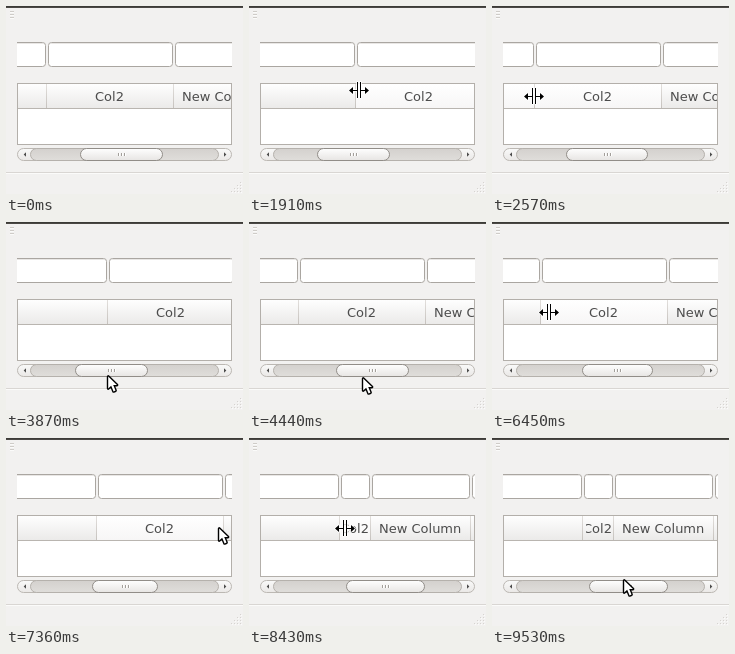
Recreate the animation shown at these times as an HTML page with a canvas. Size 237x188 px, loop 9560 ms.

```html
<!DOCTYPE html>
<html lang="en">
<head>
<meta charset="utf-8">
<title>Header columns</title>
<style>
html, body { margin: 0; width: 100%; height: 100%; overflow: hidden; background: #f2f1f0; }
canvas { display: block; width: 237px; height: 188px; }
</style>
</head>
<body>
<canvas id="stage"></canvas>
<script>
const W = 237, H = 188, LOOP = 9560, STEP = 40;
const MIN_WIDTH = 31, VIEW = 214, TROUGH = 189;
const LAG = 28; // widgets trail the pointer slightly
const canvas = document.getElementById('stage');
const ctx = canvas.getContext('2d');
const dpr = window.devicePixelRatio || 1;
canvas.width = W * dpr;
canvas.height = H * dpr;
ctx.scale(dpr, dpr);

// Pointer gestures: start, end, and the point reached.
const entry = { x: 76, y: 98, time: 440 };
const moves = [
  [440, 1070, 40, 80],
  [1590, 1950, 113, 84], [1950, 2330, 22, 89], [2330, 2530, 42, 90], [2570, 2890, 101, 89],
  [3080, 3520, 101, 152],
  [3870, 4190, 156, 155], [4190, 4590, 89, 154], [4590, 4930, 124, 153],
  [5090, 5290, 82, 93], [5290, 5950, 35, 91],
  [6330, 6610, 91, 88],
  [6760, 7360, 212, 88], [7360, 7590, 216, 90],
  [8110, 8430, 96, 90], [8430, 8510, 106, 90],
  [8670, 9100, 113, 149], [9290, 9530, 131, 140]
];
const drags = {
  widen: [1590, 3080], scroll: [3870, 5000], widenMore: [6330, 6760], narrow: [8110, 8670]
};

const clamp = (v, lo, hi) => Math.min(hi, Math.max(lo, v));
const smooth = u => u * u * (3 - 2 * u);

function pointer(t) {
  let { x, y } = entry;
  for (const [start, end, toX, toY] of moves) {
    if (t <= start) break;
    const elapsed = t >= end ? end - start : t - start;
    const u = smooth(elapsed / (end - start));
    x += (toX - x) * u;
    y += (toY - y) * u;
  }
  return { x: Math.round(x), y: Math.round(y) };
}

function stepped(t) {
  const move = moves.find(([start, end]) => t >= start && t < end);
  return move ? move[0] + Math.floor((t - move[0]) / STEP) * STEP : t;
}

function pull(t, [start, end]) {
  return pointer(clamp(t - LAG, start, end)).x - pointer(start).x;
}

function layout(t) {
  const columns = [
    { name: 'Col1', width: 158 + pull(t, drags.widen) + pull(t, drags.widenMore) },
    { name: 'Col2', width: Math.max(MIN_WIDTH, 127 + pull(t, drags.narrow)) },
    { name: 'New Column', width: 100 },
    { name: 'New Column', width: 102 }
  ];
  const total = columns.reduce((sum, c) => sum + c.width, 0);
  const offset = 130 + Math.round(pull(t, drags.scroll) * 548 / TROUGH);
  let left = 12 - offset;
  for (const c of columns) {
    c.left = left;
    left = c.right = left + c.width;
  }
  return { columns, total, offset };
}

function fill(x, y, w, h, color) {
  ctx.fillStyle = color;
  ctx.fillRect(x, y, w, h);
}

function box(x, y, w, h, r, paint, border) {
  ctx.beginPath();
  ctx.roundRect(x + .5, y + .5, w - 1, h - 1, r);
  ctx.fillStyle = paint;
  ctx.fill();
  ctx.strokeStyle = border;
  ctx.lineWidth = 1;
  ctx.stroke();
}

function shade(y0, y1, top, bottom) {
  const g = ctx.createLinearGradient(0, y0, 0, y1);
  g.addColorStop(0, top);
  g.addColorStop(1, bottom);
  return g;
}

function clipped(x, y, w, h, draw) {
  ctx.save();
  ctx.beginPath();
  ctx.rect(x, y, w, h);
  ctx.clip();
  draw();
  ctx.restore();
}

function drawWindow() {
  fill(0, 0, W, H, '#f2f1f0');
  fill(0, 0, W, 1, '#3c3b37');
  fill(0, 1, W, 1, '#4a4844');
  for (let y = 5; y < 13; y += 3) {
    fill(4, y, 4, 1, '#cfccc8');
    fill(4, y + 1, 4, 1, '#fbfbfa');
  }
  fill(0, 166, W, 1, '#d9d6d3');
  fill(0, 167, W, 1, '#fbfbfa');
  for (let row = 0; row < 4; row++) {
    for (let col = 0; col <= row; col++) {
      const x = 234 - col * 3, y = 176 + row * 3;
      fill(x, y, 1, 1, '#d6d3d0');
      fill(x + 1, y + 1, 1, 1, '#fbfbfa');
    }
  }
}

function drawEdits(columns) {
  clipped(11, 34, 215, 29, () => {
    for (const c of columns) {
      box(c.left + 2, 36, c.width - 2, 25, 3, '#ffffff', '#aaa6a1');
      fill(c.left + 5, 37, c.width - 8, 1, '#e9e7e5');
    }
  });
}

function drawTable(columns, hoverX) {
  fill(11, 77, 215, 62, '#b3afaa');
  fill(12, 78, 213, 60, '#ffffff');
  fill(12, 78, 213, 24, shade(78, 102, '#fefefe', '#ebeae9'));
  fill(12, 102, 213, 1, '#b9b5b0');
  ctx.font = '13px "DejaVu Sans", sans-serif';
  clipped(12, 78, 213, 24, () => {
    for (const c of columns) {
      if (hoverX > c.left - 2 && hoverX < c.right + 2) {
        fill(c.left + 1, 78, c.width - 1, 24, shade(78, 102, '#ffffff', '#f7f6f6'));
      }
      fill(c.right, 78, 1, 24, shade(78, 102, '#e2dfdc', '#c6c2be'));
      clipped(c.left + 4, 78, c.width - 6, 24, () => {
        const indent = Math.round((c.width - ctx.measureText(c.name).width) / 2);
        ctx.fillStyle = '#4c4c4c';
        ctx.fillText(c.name, c.left + indent, 95);
      });
    }
  });
}

function drawStepper(x, dir) {
  ctx.beginPath();
  ctx.moveTo(x - dir, 146.3);
  ctx.lineTo(x - dir, 150.7);
  ctx.lineTo(x + dir * 1.3, 148.5);
  ctx.fillStyle = '#4c4c4c';
  ctx.fill();
}

function drawScrollbar(offset, total) {
  box(11, 142, 215, 13, 6, shade(142, 155, '#fafafa', '#e9e7e5'), '#bcb8b3');
  box(24, 142, TROUGH, 13, 6, shade(142, 155, '#d3d0cd', '#e0dedb'), '#b5b1ac');
  drawStepper(19, -1);
  drawStepper(219, 1);
  const x = Math.round(24 + offset / total * TROUGH);
  const w = Math.floor(VIEW / total * TROUGH);
  box(x, 142, w, 13, 6, shade(142, 155, '#ffffff', '#e6e4e2'), '#918d88');
  const mid = Math.floor(x + w / 2);
  for (const dx of [-3, 0, 3]) {
    fill(mid + dx, 147, 1, 3, '#a39f9a');
    fill(mid + dx + 1, 147, 1, 3, '#ffffff');
  }
}

const arrow = new Path2D('M1.2 2.6V14.6L4.2 11.8 6.6 17.4 8.5 16.6 6.2 11H10Z');
const splitter = new Path2D(
  'M-2-8H-1V8H-2ZM1-8H2V8H1ZM-10 .5L-6-3V0H-2V1H-6V4ZM10 .5L6-3V0H2V1H6V4Z');

function drawCursor(x, y, split) {
  ctx.save();
  ctx.translate(x, y);
  ctx.lineJoin = 'round';
  ctx.strokeStyle = split ? '#ffffff' : '#000000';
  ctx.fillStyle = split ? '#000000' : '#ffffff';
  ctx.lineWidth = split ? 1.6 : 2.8;
  const shape = split ? splitter : arrow;
  ctx.stroke(shape);
  ctx.fill(shape);
  ctx.restore();
}

function render(now) {
  const t = stepped(now);
  const { columns, total, offset } = layout(t);
  const { x, y } = pointer(t);
  const shown = now >= entry.time;
  const inHeader = shown && y > 77 && y < 102;
  const held = [drags.widen, drags.widenMore, drags.narrow]
    .some(([start, end]) => now >= start && now < end + STEP);
  const nearEdge = inHeader && columns.some(c => Math.abs(c.right - x) <= 4);
  drawWindow();
  drawEdits(columns);
  drawTable(columns, inHeader ? x : NaN);
  drawScrollbar(offset, total);
  if (shown) drawCursor(x, y, held || nearEdge);
}

const start = performance.now();
function tick() {
  render((performance.now() - start) % LOOP);
  requestAnimationFrame(tick);
}
tick();
</script>
</body>
</html>
```
